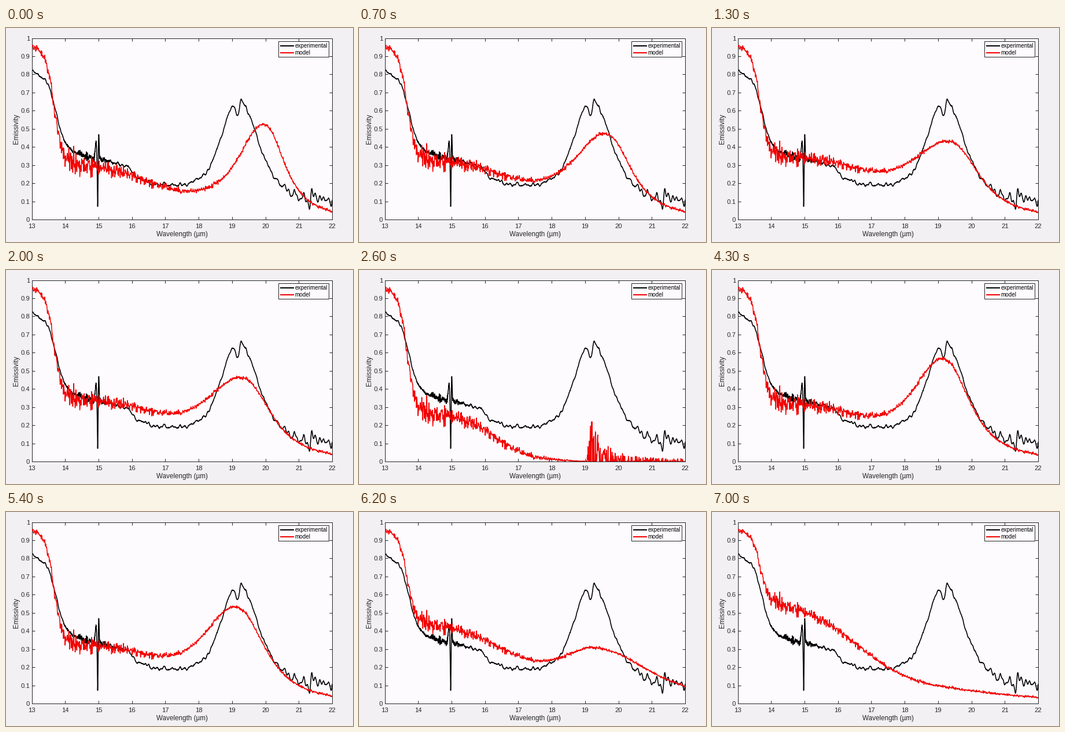
A matplotlib script that plays this animation: 600 by 371 pixels, repeating every 7.1 s.

```python
import numpy as np
import matplotlib.pyplot as plt
from matplotlib.animation import FuncAnimation
from matplotlib.lines import Line2D
from matplotlib.patches import Rectangle
from matplotlib.transforms import Affine2D

W, H, DPI = 600, 371, 100
FRAMES, INTERVAL = 71, 100
PT = 72 / DPI  # points per pixel

BACK, PAPER, INK, RED = "#f2f0f3", "#fdfbfe", "#262626", "#f20000"
plt.rcParams["font.family"] = "Liberation Sans"
rng = np.random.default_rng(12)


def fall(x, center, width):
    """Smooth step from 1 down to 0."""
    return 1 / (1 + np.exp((x - center) / width))


def bell(x, center, width):
    return np.exp(-((x - center) / width) ** 2 / 2)


def peak(x, center, left, right, left_power=2, right_power=2.4):
    """Skewed resonance with a separate half width on each side."""
    d = np.abs(x - center)
    return 1 / (1 + np.where(x < center, (d / left) ** left_power,
                             (d / right) ** right_power))


def smooth_noise(n, width):
    kernel = np.hanning(width + 2)
    noise = np.convolve(rng.normal(size=n + width), kernel, "same")[:n]
    return noise / noise.std()


def measured():
    x = np.arange(13, 22.001, 0.005)
    y = 0.09 + 0.345 * np.exp(-(x - 13) / 5.55)
    y += 0.385 * fall(x, 13.74, 0.14)
    y -= 0.08 * (1 - fall(x, 16.05, 0.12))
    # main peak with its notched crest
    y += 0.52 * peak(x, 19.25, 0.68, 0.65, left_power=3)
    y += 0.03 * bell(x, 19.28, 0.04) - 0.06 * bell(x, 19.16, 0.05)
    # ripple that grows to the right, and fine fuzz on the shelf
    ripple = smooth_noise(x.size, 22) * (0.018 - 0.012 * fall(x, 20.6, 0.3))
    fuzz = rng.normal(size=x.size) * (0.001 + 0.011 * bell(x, 14.75, 0.35))
    y += (ripple + fuzz) * (1 - bell(x, 14.97, 0.04))
    # sharp absorption line
    y += 0.09 * bell(x, 14.925, 0.02) + 0.14 * bell(x, 15.007, 0.012)
    y -= 0.27 * bell(x, 14.975, 0.011)
    return x, y


X = np.linspace(13, 22, 901)
SPREAD = 0.004 + 0.033 * np.exp(-np.where(X < 14.2, (14.2 - X) / 0.6,
                                          (X - 14.2) / 1.5))
NOISE = rng.normal(size=X.size) * SPREAD
SPIKES = rng.random(X.size) ** 1.2 * (rng.random(X.size) < 0.45)
SPIKES *= np.clip((X - 19.06) / 0.08, 0, 1)

# shelf height, center, width; peak height, center, left, right; noise
KEYS = [0, 13, 43, 54, 70]
FITS = np.array([
    [.31, 16.7, .90, .515, 19.92, .95, .77, 1.0],
    [.33, 16.8, .85, .415, 19.30, 1.50, 1.07, .85],
    [.31, 16.7, .85, .550, 19.12, 1.15, .97, .95],
    [.31, 16.7, .85, .515, 19.08, 1.25, 1.05, .8],
    [.59, 16.7, 1.0, .050, 19.50, 1.50, 3.00, .7]])
COLLAPSED = [.27, 16.3, .55, 0, 19.3, 1, 1, 1.0]
WILD = (6, 36, 46, 51)


def spectrum(shelf, edge, slope, height, center, left, right, noise):
    y = shelf * fall(X, edge, slope) + height * peak(X, center, left, right)
    y += (0.955 - y) * fall(X, 13.66, 0.13)
    return y + noise * NOISE * np.clip(y / 0.015, 0, 1)


def model(frame):
    if frame in WILD:
        y = spectrum(*COLLAPSED[:-1], 4.5)
        y += 0.88 * np.exp(-(X - 19.2) / 0.9) * SPIKES
    elif frame % 8 == 2:  # regular trial step without a peak
        y = spectrum(*COLLAPSED)
        y += (0.21 * np.exp(-(X - 19.2) / 0.45) + 0.018) * SPIKES
    else:
        y = spectrum(*(np.interp(frame, KEYS, column) for column in FITS.T))
    return np.where(y > 0.96, 0.96 + (y - 0.96) * 0.2, y).clip(0, 1)


fig = plt.figure(figsize=(W / DPI, H / DPI), dpi=DPI, facecolor=BACK)
pixels = Affine2D().scale(1 / W, -1 / H).translate(0, 1) + fig.transFigure

LEFT, RIGHT, TOP, BOTTOM = 44.5, 564, 17.5, 332
ax = fig.add_axes([LEFT / W, 1 - BOTTOM / H,
                   (RIGHT - LEFT) / W, (BOTTOM - TOP) / H], facecolor=PAPER)
ax.set_xlim(13, 22)
ax.set_ylim(0, 1)
ax.set_xticks(range(13, 23))
ax.set_yticks(np.arange(11) / 10, [f"{i / 10:g}" for i in range(11)])
ax.tick_params(direction="in", top=True, right=True, length=5 * PT,
               width=PT, color=INK, labelcolor=INK, labelsize=11.3 * PT)
ax.tick_params(axis="x", pad=6.6 * PT)
ax.tick_params(axis="y", pad=3.5 * PT)
for spine in ax.spines.values():
    spine.set(linewidth=PT, color=INK)


def stroke(xs, ys, color, width):
    fig.add_artist(Line2D(xs, ys, color=color, linewidth=width * PT,
                          transform=pixels, zorder=3,
                          solid_capstyle="butt"))


def label(x, y, text, size, **style):
    fig.text(x, y, text, transform=pixels, fontsize=size * PT, **style)


label(304.7, 361, "Wavelength (µm)", 11.6, color=INK, ha="center",
      va="baseline")
label(17.7, 175, "Emissivity", 11.7, color=INK, ha="center", va="center",
      rotation=90)
stroke([0, W], [370.5, 370.5], "#8c8a8d", 1)

ax.plot(*measured(), color="black", linewidth=1.6 * PT, zorder=2)
model_line, = ax.plot(X, model(0), color=RED, linewidth=1.5 * PT, zorder=3)

fig.add_artist(Rectangle((470.6, 22.6), 87, 27, facecolor=PAPER,
                         edgecolor=INK, linewidth=PT, transform=pixels,
                         zorder=2))
for y, name, color in ((31, "experimental", "black"), (43, "model", RED)):
    stroke([473.5, 497.5], [y, y], color, 2)
    label(499.3, y + 3.5, name, 9.9, color="black", va="baseline")


def update(frame):
    model_line.set_ydata(model(frame))
    return model_line,


anim = FuncAnimation(fig, update, frames=FRAMES, interval=INTERVAL,
                     repeat=True, repeat_delay=0, blit=False)
plt.show()
```
